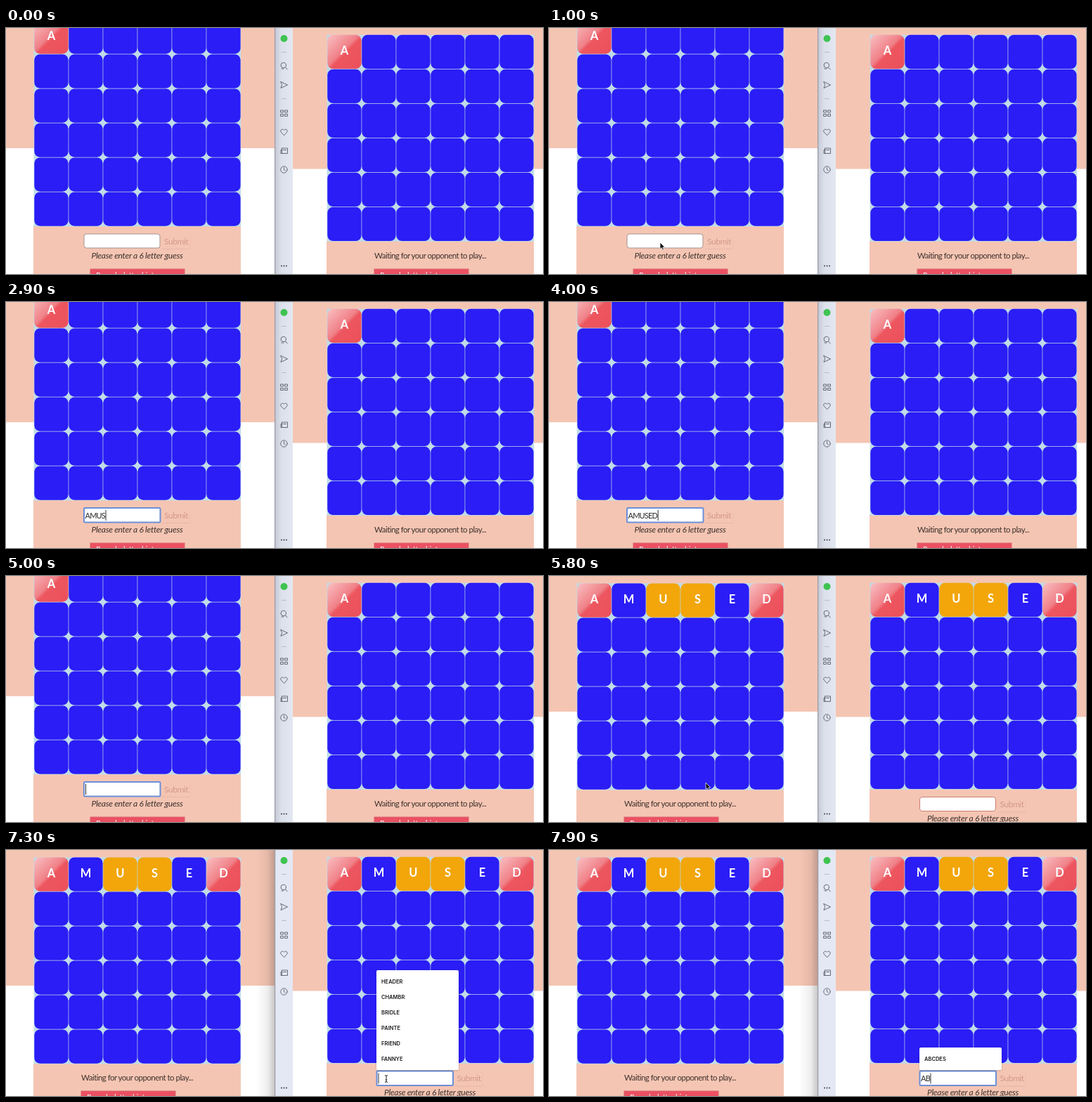
An HTML page that plays this animation: 764x350 px, repeating every 8000 ms.

```html
<!DOCTYPE html>
<html lang="en">
<head>
<meta charset="utf-8">
<title>Two-player word game</title>
<style>
  html, body { margin: 0; width: 100%; height: 100%; overflow: hidden; background: #fff; }
  svg { display: block; width: 764px; height: 350px; }
  text { font-family: Lato, "Open Sans", sans-serif; white-space: pre; }
  .letter { font-size: 16.5px; font-weight: 700; fill: #fff; text-anchor: middle; }
  .wait { font-size: 11.5px; letter-spacing: -.53px; fill: #3d322d; }
  .hint { font-size: 12px; letter-spacing: -.28px; font-style: italic; fill: #3d322d; }
  .submit { font-size: 12px; letter-spacing: -.45px; fill: #d3998a; }
  .typed { font-size: 11px; letter-spacing: -.8px; fill: #2b2b2b; }
  .button { font-size: 11px; letter-spacing: -.4px; fill: #fff; }
  .item { font: 600 7.5px Inter, "Liberation Sans", sans-serif; fill: #1c1c1c; }
  .icon { fill: none; stroke: #575c68; stroke-width: .9; stroke-linejoin: round; stroke-linecap: round; }
</style>
</head>
<body>
<svg id="stage" viewBox="0 0 764 350">
  <defs>
    <linearGradient id="red" x1="0" y1="0" x2="1" y2="1">
      <stop offset="0" stop-color="#f9c0c2"/>
      <stop offset=".46" stop-color="#f08188"/>
      <stop offset=".54" stop-color="#ed565f"/>
      <stop offset="1" stop-color="#ec505b"/>
    </linearGradient>
    <linearGradient id="barShade">
      <stop offset="0" stop-color="#c6cad6"/>
      <stop offset=".35" stop-color="#dce0eb"/>
      <stop offset="1" stop-color="#e3e7f2"/>
    </linearGradient>
    <linearGradient id="winShade">
      <stop offset="0" stop-color="#302828" stop-opacity="0"/>
      <stop offset=".6" stop-color="#302828" stop-opacity=".08"/>
      <stop offset="1" stop-color="#302828" stop-opacity=".28"/>
    </linearGradient>
    <filter id="soft" x="-10%" y="-10%" width="120%" height="125%">
      <feDropShadow dx="0" dy=".5" stdDeviation="1" flood-opacity=".25"/>
    </filter>
  </defs>
</svg>
<script>
const LOOP = 8000;
const PEACH = '#f5c5b3', BLUE = '#2a1df6', GOLD = '#f2a60a', RED = 'url(#red)';
const PITCH = 49, TILE = 48.3;
const stage = document.getElementById('stage');

function add(parent, tag, attrs = {}, text) {
  const node = document.createElementNS('http://www.w3.org/2000/svg', tag);
  for (const key in attrs) node.setAttribute(key, attrs[key]);
  if (text) node.textContent = text;
  parent.appendChild(node);
  return node;
}
const rect = (p, x, y, width, height, fill, more) =>
  add(p, 'rect', { x, y, width, height, fill, ...more });
const label = (p, cls, x, y, text) => add(p, 'text', { class: cls, x, y }, text);
const group = p => add(p, 'g');
const show = (node, on) => node.setAttribute('display', on ? 'inline' : 'none');

// A 6 by 6 board; returns a function that hides or reveals the first row.
function board(p, x, y) {
  rect(p, x - .7, y, 294.6, 294, '#bfdbe8');
  const first = [];
  for (let i = 0; i < 36; i++) {
    const tile = rect(p, x + i % 6 * PITCH, y + Math.floor(i / 6) * PITCH, TILE, TILE, BLUE, { rx: 8 });
    if (i < 6) first.push(tile);
  }
  const letters = [...'AMUSED'].map((c, i) => label(p, 'letter', x + 24.2 + i * PITCH, y + 28.2, c));
  const colours = [RED, BLUE, GOLD, GOLD, BLUE, RED];
  return solved => first.forEach((tile, i) => {
    const open = solved || i === 0;
    tile.setAttribute('fill', open ? colours[i] : BLUE);
    show(letters[i], open);
  });
}

function entry(p, x, y, rim) {
  rect(p, x + 111, y + 21, 40, 1, '#e8b6a5');
  rect(p, x + 150.5, y + 2, 1, 20, '#efbdac');
  const plain = group(p);
  rect(plain, x, y, 108, 20, '#fff', { rx: 3.5, stroke: rim, 'stroke-width': 1 });
  const ring = group(p);
  rect(ring, x, y, 108.5, 20.5, '#fff', { rx: 1.5, stroke: '#6b8fd8', 'stroke-width': 2 });
  const typed = label(ring, 'typed', x + 1.5, y + 14.5, '');
  const caret = rect(ring, x, y + 3, 1, 15, '#333');
  label(p, 'submit', x + 114, y + 14.7, 'Submit');
  label(p, 'hint', x + 10.5, y + 34.5, 'Please enter a 6 letter guess');
  return (focus, value) => {
    show(plain, !focus);
    show(ring, focus);
    typed.textContent = value;
    caret.setAttribute('x', x + 2 + (value ? typed.getComputedTextLength() : 0));
  };
}

function redButton(p, x) {
  rect(p, x, 343, 134, 20, '#ec5063', { stroke: '#d9626c', 'stroke-width': 1 });
  label(p, 'button', x + 8, 356, 'Reveal a letter hint');
}
function waiting(p, x) {
  label(p, 'wait', x, 327.5, 'Waiting for your opponent to play...');
  redButton(p, x);
}

// Left window
const page = group(stage);
rect(page, 0, -30, 383, 201, PEACH);
rect(page, 39, 281.5, 295, 80, PEACH);
const leftBoard = board(page, 40.3, -11.6);
const leftPlay = group(stage), leftWait = group(stage);
const leftEntry = entry(leftPlay, 111, 293, '#a3938d');
redButton(leftPlay, 120);
waiting(leftWait, 107);
const winShade = rect(stage, 356, 0, 27, 350, 'url(#winShade)');

// Right window
rect(stage, 408, 0, 356, 350, '#fff');
rect(stage, 408, 0, 356, 200.5, PEACH);
rect(stage, 456, 303, 295, 50, PEACH);
const rightBoard = board(stage, 457.3, 9.8);
const rightWait = group(stage), rightPlay = group(stage);
waiting(rightWait, 524);
const rightEntry = entry(rightPlay, 527.5, 314.5, '#cb7f70');

function menu(top, words) {
  const g = group(stage);
  rect(g, 527, top, 117, 313 - top, '#fff', { rx: 2, filter: 'url(#soft)' });
  words.forEach((word, i) => label(g, 'item', 534, top + 18.8 + i * 22, word));
  return g;
}
const fullMenu = menu(171, ['HEADER', 'CHAMBR', 'BRIDLE', 'PAINTE', 'FRIEND', 'FANNYE']);
const shortMenu = menu(281, ['ABCDES']);

// Sidebar
rect(stage, 383, 0, 25, 350, '#e4e8f4');
const barShade = rect(stage, 383, 0, 25, 350, 'url(#barShade)');
rect(stage, 382, 0, 1.3, 350, '#9c9ea9');
add(stage, 'circle', { cx: 395.5, cy: 15, r: 5, fill: '#3fc351' });
rect(stage, 392, 34, 7, 1, '#b9bdc8');
rect(stage, 392, 100, 7, 1, '#b9bdc8');
[
  'M398.5 53a3.7 3.7 0 1 1-7.4 0a3.7 3.7 0 1 1 7.4 0M397.5 56l2.7 3M392 58h3',
  'M391 76.5l9.5 4.5l-9.5 4.5l1.6-4.5z',
  'M391 117h3.5v3h-3.5zM397 117h3.5v3h-3.5zM391 122.5h3.5v3h-3.5zM397 122.5h3.5v3h-3.5z',
  'M395.5 152.5l-4.2-4.3c-2-3 2-5.8 4.2-2.8c2.2-3 6.2-.2 4.2 2.8z',
  'M392.5 171h8v7.5h-9.5v-5h1.5zM392.5 173v5M394.5 173.5h4',
  'M400.2 201.5a4.7 4.7 0 1 1-9.4 0a4.7 4.7 0 1 1 9.4 0M395.5 198.7v3l2 1.2'
].forEach(d => add(stage, 'path', { class: 'icon', d }));
for (const cx of [392, 395.5, 399]) add(stage, 'circle', { cx, cy: 338.5, r: 1, fill: '#3d424d' });

// Pointer
const pointer = group(stage);
const arrow = add(pointer, 'path', {
  d: 'M0 0V9.6L2.2 7.6L3.8 11L5.4 10.3L3.9 7H6.8Z', fill: '#111', stroke: '#fff', 'stroke-width': .7
});
const beam = add(pointer, 'path', {
  d: 'M-2-4.5Q0-4.5 0-3Q0-4.5 2-4.5M0-3V4M-2 5.5Q0 5.5 0 4Q0 5.5 2 5.5M-1.3 2H1.3',
  fill: 'none', stroke: '#222', 'stroke-width': 1
});

// Times are in ms
const CLICK = 1500, SOLVED = 5300, RIGHT_CLICK = 6900;
const leftText = [[0, ''], [2000, 'A'], [2300, 'AM'], [2500, 'AMU'], [2800, 'AMUS'],
  [3100, 'AMUSE'], [3400, 'AMUSED'], [4600, '']];
const rightText = [[0, ''], [7600, 'A'], [7800, 'AB']];
const paths = [
  [[500, 235, 340], [900, 158, 305], [2000, 158, 305]],
  [[5300, 158, 305], [5700, 223, 294], [6000, 223, 294], [6700, 541, 325], [7600, 541, 325]]
];

const valueAt = (steps, t) => steps.filter(s => s[0] <= t).pop()[1];

function pointAt(t) {
  const path = paths.find(p => t >= p[0][0] && t < p[p.length - 1][0]);
  if (!path) return null;
  const i = path.findIndex(p => p[0] > t);
  const [t0, x0, y0] = path[i - 1], [t1, x1, y1] = path[i];
  const u = (t - t0) / (t1 - t0), e = u * u * (3 - 2 * u);
  return [x0 + (x1 - x0) * e, y0 + (y1 - y0) * e];
}

function draw(t) {
  const solved = t >= SOLVED, rightFocus = t >= RIGHT_CLICK;
  const value = valueAt(rightText, t);
  page.setAttribute('transform', `translate(0 ${solved ? 22 : 0})`);
  leftBoard(solved);
  rightBoard(solved);
  show(leftPlay, !solved);
  show(leftWait, solved);
  show(rightPlay, solved);
  show(rightWait, !solved);
  leftEntry(t >= CLICK, valueAt(leftText, t));
  rightEntry(rightFocus, value);
  show(fullMenu, rightFocus && !value);
  show(shortMenu, !!value);
  show(winShade, rightFocus);
  show(barShade, !rightFocus);
  const at = pointAt(t);
  show(pointer, at);
  if (at) {
    const inField = at[0] > 527 && at[0] < 636 && at[1] > 314;
    pointer.setAttribute('transform', `translate(${at[0]} ${at[1]})`);
    show(arrow, !inField);
    show(beam, inField);
  }
}

const start = performance.now();
function tick(now) {
  draw(Math.max(0, now - start) % LOOP);
  requestAnimationFrame(tick);
}
draw(0);
requestAnimationFrame(tick);
</script>
</body>
</html>
```
